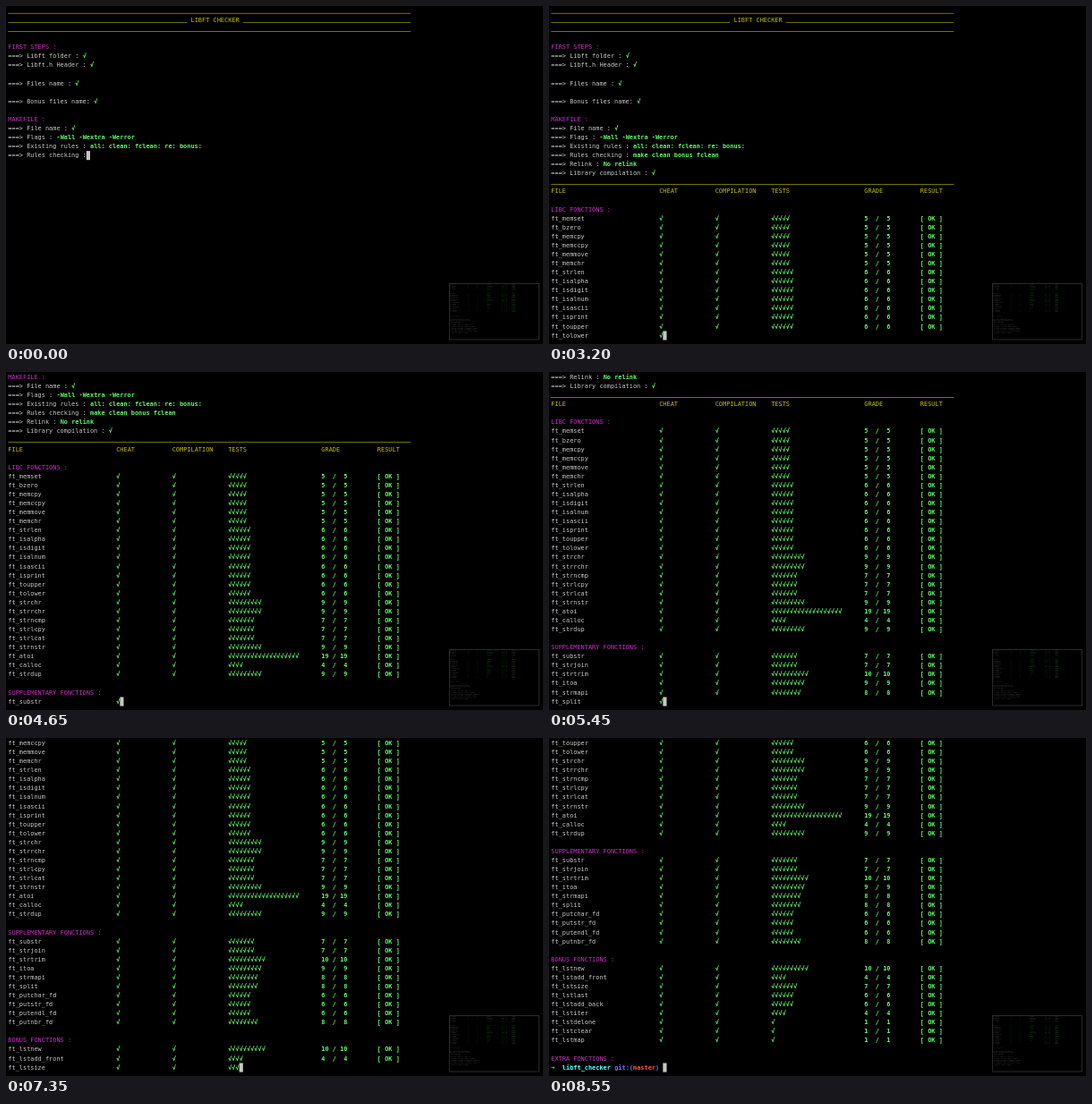
An HTML page with a canvas for the animation above (8.6 s loop, 600 by 378 pixels).

```html
<!DOCTYPE html>
<html lang="en">
<head>
<meta charset="utf-8">
<title>Libft checker</title>
<style>
  html, body { margin: 0; width: 100%; height: 100%; overflow: hidden; background: #000; }
  canvas { display: block; }
</style>
</head>
<body>
<canvas id="stage" width="600" height="378"></canvas>
<script>
const ctx = document.getElementById('stage').getContext('2d');
const LOOP = 8600, ROWS = 37;
const CW = 4.167, LH = 10.07, LEFT = 2.3, TOP = 1, BASE = 7.05;
const SIZE = 69.2; // text is laid out at 10x and scaled down
const FONT = SIZE + 'px "DejaVu Sans Mono", monospace';
const GRAY = '#c7c7c7', YELLOW = '#c2be10', OLIVE = '#a8a410', MAGENTA = '#c930c7',
      GREEN = '#5ffa68', CYAN = '#60fdff', BLUE = '#6871ff', RED = '#ff4f48';
const COL = { cheat: 29, comp: 44, tests: 59, grade: 84, result: 99 };

const span = (col, text, color = GRAY, bold = false) => ({ col, text, color, bold });
const good = (col, text) => span(col, text, GREEN, true);
const line = (col, count) => ({ col, count, color: OLIVE });

// rows: each has a start time and a list of spans for a given time
const rows = [];
const add = (at, spans) => rows.push({ at, spans: typeof spans === 'function' ? spans : () => spans });
const blank = at => add(at, []);
const title = (at, text) => add(at, [span(0, text + ' :', MAGENTA)]);
const step = (at, label, words = [], times = []) => add(at, t => {
  const head = '===> ' + label;
  const shown = words.filter((w, i) => t >= (times[i] || 0)).join(' ');
  return shown ? [span(0, head), good(head.length + 1, shown)] : [span(0, head)];
});

const tests = (
  'memset5 bzero5 memcpy5 memccpy5 memmove5 memchr5 strlen6 isalpha6 isdigit6 isalnum6 ' +
  'isascii6 isprint6 toupper6 tolower6 strchr9 strrchr9 strncmp7 strlcpy7 strlcat7 strnstr9 ' +
  'atoi19 calloc4 strdup9 substr7 strjoin7 strtrim10 itoa9 strmapi8 split8 putchar_fd6 ' +
  'putstr_fd6 putendl_fd6 putnbr_fd8 lstnew10 lstadd_front4 lstsize7 lstlast6 lstadd_back6 ' +
  'lstiter4 lstdelone1 lstclear1 lstmap1'
).split(' ').map(s => {
  const [, name, n] = s.match(/^(\D+)(\d+)$/);
  return { name: 'ft_' + name, n: +n };
});

// f runs from 0 to 1 while one function is being checked
function testSpans({ name, n }, f) {
  const out = [span(0, name), good(COL.cheat, '√')];
  if (f < 0.57) return out;
  out.push(good(COL.comp, '√'));
  const done = Math.min(n, Math.floor((f - 0.6) / 0.35 * n));
  if (done > 0) out.push(good(COL.tests, '√'.repeat(done)));
  if (f >= 0.95) {
    const grade = String(n).padEnd(2) + ' / ' + String(n).padStart(2);
    out.push(good(COL.grade, grade), good(COL.result, '[ OK ]'));
  }
  return out;
}

// first function of each stretch, its start and the time per function
const pace = [[0, 1440, 135], [18, 3870, 146], [23, 4600, 160], [28, 5400, 252], [35, 7164, 240], [36, 7404, 155]];
const slot = i => {
  const [first, start, len] = pace.filter(p => p[0] <= i).pop();
  return { at: start + (i - first) * len, len };
};

add(0, [line(0, 108)]);
add(0, [line(0, 48), span(49, 'LIBFT CHECKER', YELLOW), line(63, 45)]);
add(0, [line(0, 108)]);
blank(0);
title(0, 'FIRST STEPS');
step(0, 'Libft folder :', ['√']);
step(0, 'Libft.h Header :', ['√']);
blank(0);
step(0, 'Files name :', ['√']);
blank(0);
step(0, 'Bonus files name:', ['√']);
blank(0);
title(0, 'MAKEFILE');
step(0, 'File name :', ['√']);
step(0, 'Flags :', ['-Wall -Wextra -Werror']);
step(0, 'Existing rules :', ['all: clean: fclean: re: bonus:']);
step(0, 'Rules checking :', ['make', 'clean', 'bonus', 'fclean'], [200, 380, 640, 820]);
step(920, 'Relink :', ['No relink'], [1100]);
step(1120, 'Library compilation :', ['√'], [1380]);
add(1400, [line(0, 108)]);
add(1400, [
  span(0, 'FILE', YELLOW), span(COL.cheat, 'CHEAT', YELLOW), span(COL.comp, 'COMPILATION', YELLOW),
  span(COL.tests, 'TESTS', YELLOW), span(COL.grade, 'GRADE', YELLOW), span(COL.result, 'RESULT', YELLOW)
]);

const sections = { 0: 'LIBC FONCTIONS', 23: 'SUPPLEMENTARY FONCTIONS', 33: 'BONUS FONCTIONS' };
tests.forEach((test, i) => {
  const { at, len } = slot(i);
  if (sections[i]) {
    blank(at);
    title(at, sections[i]);
  }
  add(at, t => testSpans(test, (t - at) / len));
});
blank(8340);
title(8340, 'EXTRA FONCTIONS');
add(8400, [
  good(0, '➜'), span(3, 'libft_checker', CYAN, true), span(17, 'git:(', BLUE, true),
  span(22, 'master', RED, true), span(28, ')', BLUE, true), span(29, ' ')
]);

function drawRow(spans, r) {
  const y = TOP + r * LH + BASE;
  for (const s of spans) {
    const x = LEFT + s.col * CW;
    ctx.fillStyle = s.color;
    if (s.count) {
      ctx.fillRect(x, y - 0.2, s.count * CW, 0.7);
      continue;
    }
    ctx.save();
    ctx.translate(x, y);
    ctx.scale(0.1, 0.1);
    ctx.font = (s.bold ? 'bold ' : '') + FONT;
    ctx.fillText(s.text, 0, 0);
    ctx.restore();
  }
}

// small preview of an earlier run in the lower right corner
const preview = [
  ...tests.slice(24, 28).map(f => testSpans(f, 1)), [], [],
  ...tests.slice(28, 41).map(f => testSpans(f, 1)), [], [],
  [span(0, 'EXTRA FONCTIONS :', MAGENTA)], [],
  [span(0, '===> libft_checker git:(master)')],
  [span(0, 'checking files and rules of libft')],
  [span(2, 'make clean bonus')], [],
  ...['all: ok   clean: ok   bonus: ok', 'ft_memset ft_bzero ft_memcpy ft_memchr',
    'ft_strlen ft_isalpha ft_isdigit ft_isalnum', 'ft_strchr ft_strrchr ft_strncmp ft_split',
    'ft_lstnew ft_lstsize ft_lstlast ft_lstmap', 'ft_atoi ft_calloc ft_strdup'
  ].map(s => [span(2, s)])
];
function drawPreview() {
  ctx.save();
  ctx.translate(495.5, 310.5);
  ctx.strokeStyle = '#2a2a2a';
  ctx.lineWidth = 1;
  ctx.strokeRect(0, 0, 100, 62.5);
  ctx.scale(0.1675, 0.1675);
  ctx.globalAlpha = 0.36;
  preview.forEach(drawRow);
  ctx.restore();
}

function render(t) {
  ctx.fillStyle = '#000';
  ctx.fillRect(0, 0, 600, 378);
  const shown = rows.filter(r => r.at <= t);
  const view = shown.slice(-ROWS).map(r => r.spans(t));
  view.forEach(drawRow);
  const last = view[view.length - 1].slice(-1)[0];
  const col = last.col + last.text.length;
  ctx.fillStyle = GRAY;
  ctx.fillRect(LEFT + col * CW, TOP + (view.length - 1) * LH, CW, LH);
  drawPreview();
}

const start = performance.now();
function tick() {
  const t = (performance.now() - start) % LOOP;
  render(Math.floor(t / 50) * 50);
  requestAnimationFrame(tick);
}
tick();
</script>
</body>
</html>
```
